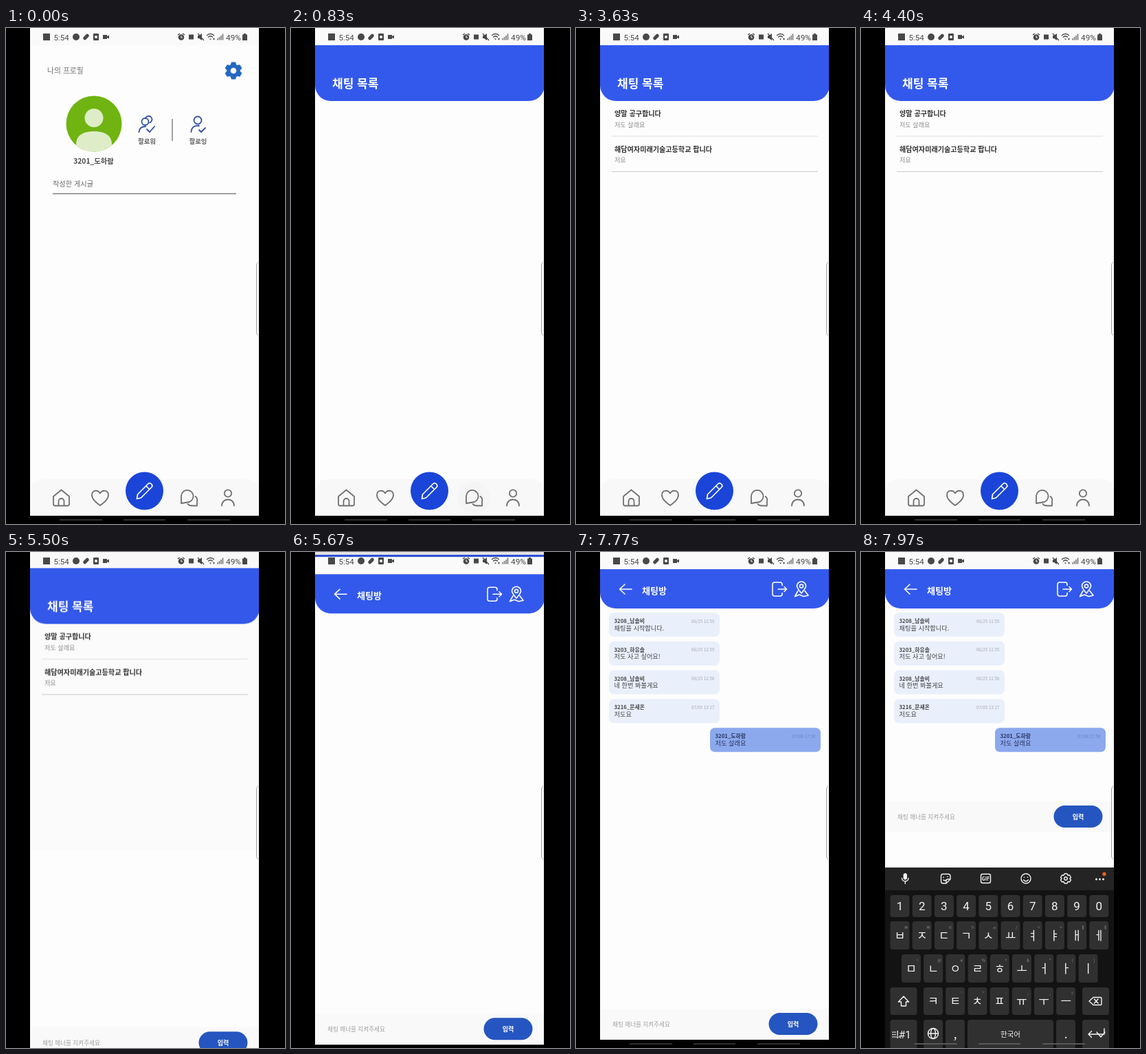
Write an HTML page that moves like this. It is 406x720 px and loops after 8000 ms.

```html
<!DOCTYPE html>
<html lang="ko">
<head>
<meta charset="utf-8">
<title>Chat app</title>
<style>
html, body { margin: 0; width: 100%; height: 100%; overflow: hidden; background: #000; }
#stage { position: relative; width: 406px; height: 720px; overflow: hidden; background: #000; }
.layer { position: absolute; inset: 0; clip-path: inset(0 38.5px 0 35.5px); }
svg { position: absolute; left: 0; top: 0; width: 406px; height: 720px; display: block; }
text { font-family: "Noto Sans CJK KR", "Noto Sans", sans-serif; }
.digit { font-family: Roboto, sans-serif; }
.line { fill: none; stroke-linecap: round; stroke-linejoin: round; }
.b { font-weight: 700; }
.mid { text-anchor: middle; }

.layer, .anim { animation: 8s linear infinite; }
#old { animation-name: oldUp; }
#room { animation-name: roomIn; }
#keys { animation-name: keysIn; }
.step { animation-timing-function: step-end; }
#profile { animation-name: profile; }
#list { animation-name: list; }
#ripple { animation-name: ripple; transform-origin: 266px 682px; }
#row1 { animation-name: row1; }
#row2 { animation-name: row2; }
.blank { animation-name: blank; }
.named { animation-name: named; }
#msgs { animation-name: msgs; }
#input { animation-name: lift; }

@keyframes profile { 0% { visibility: visible } 2.1%, 100% { visibility: hidden } }
@keyframes list { 0% { visibility: hidden } 2.1%, 100% { visibility: visible } }
@keyframes ripple {
  0%, .4% { transform: scale(.3); opacity: 0 }
  1.2% { opacity: .12 }
  4.5% { transform: scale(1); opacity: .12 }
  11%, 100% { transform: scale(1); opacity: 0 }
}
@keyframes row1 { 0% { opacity: 0 } 29.5%, 100% { opacity: 1 } }
@keyframes row2 { 0% { opacity: 0 } 29.95%, 100% { opacity: 1 } }
@keyframes blank { 0% { opacity: 1 } 32.85%, 100% { opacity: 0 } }
@keyframes named { 0% { opacity: 0 } 32.85%, 100% { opacity: 1 } }
@keyframes oldUp {
  0%, 67.875% { transform: none; filter: brightness(1); animation-timing-function: cubic-bezier(.4, 0, .2, 1) }
  74.125%, 100% { transform: translateY(-28px); filter: brightness(.88) }
}
@keyframes roomIn {
  0%, 67.875% { transform: translateY(29px); clip-path: inset(720px 38.5px 0 35.5px); animation-timing-function: cubic-bezier(.4, 0, .2, 1) }
  70.6% { clip-path: inset(0 38.5px 0 35.5px) }
  74.125%, 100% { transform: none; clip-path: inset(0 38.5px 0 35.5px) }
}
@keyframes msgs { 0% { opacity: 0 } 74.4%, 100% { opacity: 1 } }
@keyframes lift { 0% { transform: none } 98.625%, 100% { transform: translateY(-301px) } }
@keyframes keysIn {
  0%, 98.375% { transform: translateY(264px); animation-timing-function: cubic-bezier(.2, .4, .4, 1) }
  99.375%, 100% { transform: none }
}
</style>
</head>
<body>
<div id="stage">
  <svg viewBox="0 0 406 720"><path d="M78 714H140M171 714H232M264 714H326" stroke="#303030" stroke-width="2"/></svg>

  <div class="layer" id="old"><svg viewBox="0 0 406 720">
    <rect x="35" width="334" height="708" fill="#fdfdfd"/>
    <rect x="35" width="334" height="25" fill="#fafafa"/>

    <g id="profile" class="anim step">
      <text x="60" y="66" font-size="10.8" fill="#707070">나의 프로필</text>
      <g transform="translate(331 62)">
        <g id="teeth" fill="#2468c0"></g>
        <circle r="6.9" fill="none" stroke="#2468c0" stroke-width="5.200"/>
      </g>
      <clipPath id="face"><circle cx="128" cy="139" r="40.5"/></clipPath>
      <g clip-path="url(#face)">
        <rect x="87" y="98" width="82" height="82" fill="#6fb410"/>
        <circle cx="128" cy="130.5" r="13.5" fill="#deedc8"/>
        <path d="M102 182V169C102 156 112 150 128 150S154 156 154 169V182Z" fill="#deedc8"/>
      </g>
      <text x="127.5" y="197" font-size="10.3" class="b mid" fill="#484848">3201_도하람</text>
      <g class="line" stroke="#3450a0" stroke-width="1.8">
        <circle cx="202.5" cy="136" r="5"/>
        <path d="M203 130.5A5 5 0 1 1 209 137.5M193.500 151C194 145 198 143 203 143M205 147L209 151L216 143"/>
        <circle cx="279" cy="134" r="5.500"/>
        <path d="M269.500 151C270 144 274 141 281 142M281 148L284 151L290 145"/>
      </g>
      <g class="b mid" font-size="9.3" fill="#606060">
        <text x="205" y="168">팔로워</text><text x="279.500" y="168">팔로잉</text>
      </g>
      <path d="M242 132V164" stroke="#707070" stroke-width="1.3"/>
      <text x="68" y="230" font-size="10.2" fill="#666">작성한 게시글</text>
      <path d="M68 240.500H335" stroke="#808080" stroke-width="1.3"/>
    </g>

    <g id="list" class="anim step">
      <path d="M35 25H369V83A23 23 0 0 1 345 106H59A23 23 0 0 1 35 83Z" fill="#3359ec"/>
      <text x="60" y="87" font-size="17" class="b" fill="#fff">채팅 목록</text>
      <g id="row1" class="anim step"></g>
      <g id="row2" class="anim step"></g>
    </g>

    <path d="M35 708V675Q35 655 56 655H348Q369 655 369 675V708Z" fill="#f8f8f9"/>
    <circle id="ripple" class="anim" cx="266" cy="682" r="24" fill="#000"/>
    <g class="line" stroke="#707070" stroke-width="1.8">
      <path d="M69 680L80.500 670.500L92 680V691Q92 693.500 89.500 693.500H71.500Q69 693.500 69 691ZM76.500 693V687A4 4 0 0 1 84.500 687V693"/>
      <path d="M137 693C131 688.500 125 684 125 678C125 671 133.500 669.500 137 675.500C140.500 669.500 149 671 149 678C149 684 143 688.500 137 693Z"/>
      <path d="M255 690V679A8.800 8.800 0 1 1 264 688.500L255 690ZM275.500 680C278.500 682 278.500 685 278 687V693.500H271C268 693.500 266 693 264.500 691"/>
      <circle cx="323" cy="675.500" r="5.200"/>
      <path d="M314 693.500C314 681.500 332 681.500 332 693.500"/>
    </g>
    <circle cx="201.500" cy="672" r="27.500" fill="#1a45d8"/>
    <path class="line" d="M190.500 683.500L191.500 677L207 661.500Q209 659.500 211.500 662Q214 664.500 212 666.500L196.500 682ZM204 665L208.500 669.500" stroke="#fff" stroke-width="1.7"/>
  </svg></div>

  <div class="layer" id="room"><svg viewBox="0 0 406 720">
    <rect x="35" width="334" height="708" fill="#fdfdfd"/>
    <rect x="35" width="334" height="25" fill="#fafafa"/>
    <path d="M35 25H369V59A23 23 0 0 1 345 82H59A23 23 0 0 1 35 59Z" fill="#3359ec"/>
    <g class="line" stroke="#fff" stroke-width="1.6">
      <path d="M81 54H63.500L71 47M63.500 54L71 61"/>
      <path d="M300 48.500V47Q300 44 297 44H289Q286 44 286 47V61Q286 64 289 64H297Q300 64 300 61V59.500M294 54H306M303 50.500L306.500 54L303 57.500"/>
      <path d="M328 60C324 55 321.500 52 321.500 49.500A6.500 6.500 0 0 1 334.500 49.500C334.500 52 332 55 328 60ZM323 56.500L318.500 64.500L325 62L331.500 64.500L338 63L333 56.500"/>
      <circle cx="328" cy="49.500" r="2.500"/>
    </g>
    <text x="96" y="60.500" font-size="13" class="b" fill="#fff">채팅방</text>
    <g id="msgs" class="anim step"></g>
    <g id="input" class="anim step">
      <rect x="35" y="663" width="334" height="45" fill="#f9f9f9"/>
      <text x="53" y="688.500" font-size="8.6" fill="#a0a0a0">채팅 매너를 지켜주세요</text>
      <rect x="280.500" y="669" width="71" height="32" rx="16" fill="#2555c0"/>
      <text x="316" y="688.500" font-size="9" class="b mid" fill="#fff">입력</text>
    </g>
  </svg></div>

  <svg viewBox="0 0 406 720">
    <g fill="#484848">
      <rect x="54" y="8" width="10" height="10"/>
      <text x="69.500" y="17.500" font-size="11.500" class="digit">5:54</text>
      <circle cx="102" cy="13" r="5"/>
      <rect x="111.500" y="10.500" width="10" height="5" rx="2.500" transform="rotate(-45 116.500 13)"/>
      <rect x="127" y="8" width="8" height="10" rx="1"/>
      <circle cx="131" cy="13" r="2" fill="#fafafa"/>
      <path d="M141 10H147V12L150 10.500V15.500L147 14V16H141Z"/>
      <circle cx="255" cy="13.500" r="4.300"/>
      <path d="M250 10L253 8M260 10L257 8" stroke="#484848" stroke-width="1.500"/>
      <path d="M255 11V14H257" fill="none" stroke="#fafafa"/>
      <rect x="266" y="9.500" width="7" height="7"/>
      <path d="M279 11H281L285 8V18L281 15H279Z"/>
      <path d="M279 8L288 18" stroke="#484848" stroke-width="1.300"/>
      <path d="M292 11Q297.500 6 303 11M294 13.500Q297.500 10 301 13.500" fill="none" stroke="#484848" stroke-width="1.300"/>
      <path d="M296 15.500H299L297.500 17.500ZM301 15H304L302.500 18Z"/>
      <path d="M308 17.500V15M310.500 17.500V13M313 17.500V11M315.500 17.500V8.500" stroke="#707070" stroke-width="1.500"/>
      <text x="320" y="17.500" font-size="11.800" class="digit">49%</text>
      <path d="M344 9.500H346V8H349V9.500H351V18H344Z"/>
    </g>
    <path d="M367 340Q364.500 341 364.500 345V441Q364.500 445 367 446" fill="none" stroke="#a0a0a0"/>
  </svg>

  <div class="layer" id="keys"><svg viewBox="0 0 406 720">
    <rect x="35" y="458" width="334" height="262" fill="#131313"/>
    <rect x="35" y="458" width="334" height="33" fill="#242424"/>
    <g class="line" stroke="#f3f3f3" stroke-width="1.400">
      <rect x="62.300" y="467" width="4" height="8" rx="2" fill="#f3f3f3"/>
      <path d="M59.500 473.500Q60 478 64.300 478T69 473.500M64.300 478V481.500"/>
      <path d="M119 467.500H127Q130 467.500 130 470.500V475L124 481H119Q116.500 481 116.500 478V470.500Q116.500 467.500 119 467.500ZM124 481V477Q124 475 126 475H130M120 472V472.500M126 471V471.500M120 476Q121 477.500 123 476.500"/>
      <rect x="174.500" y="467.500" width="14" height="13" rx="2.500"/>
      <circle cx="240" cy="474" r="7"/>
      <path d="M237.500 472V472.300M242.500 472V472.300M236.500 476Q240 480 243.500 476"/>
      <path d="M296 467H300L301 469.500L303.500 469L305.500 472.500L303.800 474L305.500 476L303.500 479L301 478.500L300 481H296L295 478.500L292.500 479L290.500 476L292.200 474L290.500 472.500L292.500 469L295 469.500Z"/>
      <circle cx="298" cy="474" r="2.300"/>
    </g>
    <text x="181.500" y="476.800" font-size="7" class="b mid" fill="#f3f3f3">GIF</text>
    <path d="M342.500 475H342.510M347.500 475H347.510M352.500 475H352.510" stroke="#f3f3f3" stroke-width="3" stroke-linecap="round"/>
    <circle cx="354" cy="467.500" r="2.700" fill="#e8641a"/>
    <g id="board"></g>
    <g class="line" stroke="#f3f3f3" stroke-width="1.400">
      <path d="M62 645L54.500 653H58.500V659H65.500V653H69.500Z"/>
      <path d="M338 646.500H349Q350 646.500 350 648V656Q350 657.500 349 657.500H338L332 652ZM339.500 649L345 655M345 649L339.500 655"/>
      <circle cx="105" cy="699" r="7.500"/>
      <ellipse cx="105" cy="699" rx="3.500" ry="7.500"/>
      <path d="M97.500 699H112.500M354 692V700H331M335.500 695.500L331 700L335.500 704.500M343 697L349 704L355 697"/>
      <path d="M46 697H52M46 700.500H52M46 704H58" stroke-dasharray="1 2"/>
    </g>
    <path d="M78 714H140M171 714H232M264 714H326" stroke="#585858" stroke-width="2"/>
  </svg></div>
</div>

<script>
const $ = id => document.getElementById(id);
const text = (x, y, size, fill, str, cls = '') =>
  `<text x="${x}" y="${y}" font-size="${size}" fill="${fill}" class="${cls}">${str}</text>`;

// gear teeth
$('teeth').innerHTML = [0, 60, 120, 180, 240, 300].map(a =>
  `<path d="M-4.500 -8L-3 -12.500H3L4.500 -8Z" transform="rotate(${a})"/>`).join('');

// chat list rows
const row = (id, y, name, last, line) => {
  $(id).innerHTML =
    text(56, y + 4, 10.1, '#303030', '방이름', 'b anim step blank') +
    text(56, y + 4, 10.1, '#303030', name, 'b anim step named') +
    text(56, y + 19.5, 9.1, '#8c8c8c', last) +
    `<path d="M52 ${y + 33}H352" stroke="${line}"/>`;
};
row('row1', 124, '양말 공구합니다', '저도 살래요', '#e0e0e0');
row('row2', 175.5, '해담여자미래기술고등학교 팝니다', '저요', '#cacaca');

// messages
const chat = [
  ['3208_남솔비', '06/25 11:55', '채팅을 시작합니다.'],
  ['3203_하유솔', '06/25 11:55', '저도 사고 싶어요!'],
  ['3208_남솔비', '06/25 11:56', '네 한번 봐볼게요'],
  ['3216_문새온', '07/05 13:17', '저도요'],
  ['3201_도하람', '07/08 17:50', '저도 살래요']
];
$('msgs').innerHTML = chat.map(([who, when, what], i) => {
  const mine = i === 4, x = mine ? 195 : 48, y = 88 + i * 41.8;
  const ink = mine ? '#28345c' : '#454545';
  return `<rect x="${x}" y="${y}" width="161" height="35" rx="7" fill="${mine ? '#8ca9ee' : '#e9effb'}"/>` +
    text(x + 7.5, y + 15, 7.8, ink, who, 'b') +
    text(x + 120, y + 14.5, 6.2, mine ? '#6680c4' : '#a0a5b0', when) +
    text(x + 7.5, y + 25.6, 9.2, ink, what);
}).join('');

// keyboard
const key = (cx, y, w, h, label = '', size = 17, hint = '') =>
  `<rect x="${cx - w / 2}" y="${y}" width="${w}" height="${h}" rx="4" fill="#303030"/>` +
  text(cx, y + h / 2 + size * .37, size, '#f3f3f3', label, /\d/.test(label) ? 'mid digit' : 'mid') +
  text(cx + 9, y + 11, 6, '#8c8c8c', hint, 'mid');
const escape = c => ({ '<': '&lt;', '&': '&amp;' })[c] || c;
const keyRow = (x, y, h, labels, hints = '') => [...labels].map((c, i) =>
  key(x + i * 32.2, y, 28, h, c, 17, escape(hints[i]))).join('');
$('board').innerHTML =
  keyRow(56.5, 498, 32, '1234567890') +
  keyRow(56.5, 536, 41, 'ㅂㅈㄷㄱㅅㅛㅕㅑㅐㅔ', 'ㅃㅉㄸㄲㅆ/<>ㅒㅖ') +
  keyRow(73, 584, 41, 'ㅁㄴㅇㄹㅎㅗㅓㅏㅣ', '!@#%^&*()') +
  key(62, 632, 39, 40) + keyRow(105, 632, 40, 'ㅋㅌㅊㅍㅠㅜㅡ', '-\'":;,?') + key(341.5, 632, 39, 40) +
  key(62, 679, 39, 42, '!#1', 15) + key(105, 679, 28, 42) + key(137, 679, 28, 42, ',') +
  key(217.5, 679, 125, 42, '한국어', 10.5) + key(298, 679, 28, 42, '.') + key(341.5, 679, 39, 42);
</script>
</body>
</html>
```
